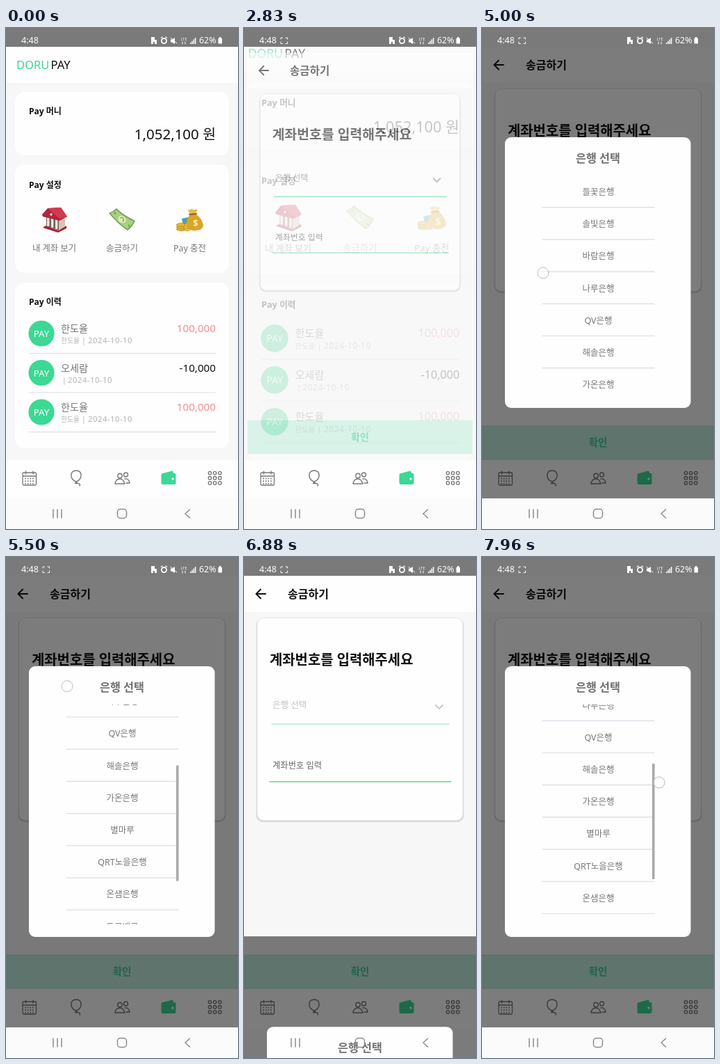
An HTML page that plays this animation: 334x720 px, repeating every 8 s.

```html
<!DOCTYPE html>
<html lang="ko">
<head>
<meta charset="utf-8">
<style>
html, body { margin: 0; width: 100%; height: 100%; overflow: hidden; background: #f7f7f7; }
svg { display: block; width: 334px; height: 720px; font-family: "Noto Sans", "Noto Sans CJK KR", "Noto Sans CJK", sans-serif; }
.line { fill: none; stroke-linecap: round; stroke-linejoin: round; }
</style>
</head>
<body>
<svg id="stage" viewBox="0 0 334 720"></svg>
<script>
const GREEN = '#3cd894', GREY = '#777', PALE = '#b3b3b3', INK = '#111', BG = '#f7f7f7', CARD = '#fefefe';
const LOOP = 8000, PITCH = 46.2, VIEW = 316, SLIDE = 693;

const text = (x, y, size, str, fill = INK, more = '') =>
  `<text x="${x}" y="${y}" font-size="${size}" fill="${fill}" ${more}>${str}</text>`;
const rect = (x, y, w, h, fill, r = 0, more = '') =>
  `<rect x="${x}" y="${y}" width="${w}" height="${h}" rx="${r}" fill="${fill}" ${more}/>`;
const circle = (x, y, r, fill, more = '') => `<circle cx="${x}" cy="${y}" r="${r}" fill="${fill}" ${more}/>`;
const ring = (x, y, r, stroke, w) => circle(x, y, r, 'none', `stroke="${stroke}" stroke-width="${w}"`);
const line = (d, stroke, w = 1) => `<path class="line" d="${d}" stroke="${stroke}" stroke-width="${w}"/>`;
const shape = (d, fill) => `<path d="${d}" fill="${fill}"/>`;
const BOLD = 'font-weight="700"', MID = 'text-anchor="middle"', END = 'text-anchor="end"';

const bankIcon =
  shape('M57 284L75 291 87 284 87 288 75 294 53 287Z', '#a32238') +
  shape('M58 270L76 275 76 291 58 285Z', '#7c5c55') +
  shape('M76 275L85 271 85 285 76 291Z', '#d9c3b4') +
  [59, 65, 71].map((x, i) => rect(x, 271 + i * 2, 3.4, 14, '#f4e7dc', 1)).join('') +
  shape('M52 268L60 259 79 258 88 271 77 277 53 271Z', '#b3243e') +
  shape('M60 259L79 258 88 271 77 274Z', '#cf3b50') +
  circle(65, 268, 1.8, '#f0d0c0');

const noteIcon =
  shape('M148 266Q154 264 159 259Q169 269 186 277Q182 286 175 291Q160 281 148 266Z', '#6f9f55') +
  shape('M150 266Q156 264 159 261Q169 271 184 278Q180 285 175 289Q161 280 150 266Z', '#a9cf82') +
  '<ellipse cx="167" cy="275" rx="6" ry="5" fill="#dcecb8" transform="rotate(35 167 275)"/>' +
  line('M165 273Q168 271 169 274T168 278', '#6f9f55', 1.2) +
  circle(157, 266, 1.5, '#6f9f55') + circle(177, 284, 1.5, '#6f9f55');

const bagIcon =
  shape('M253 274L262 272 264 280 255 283Z', '#4f9fa8') +
  [289, 286, 283].map(y => `<ellipse cx="252" cy="${y}" rx="6.5" ry="2.6" fill="#e8b62e" stroke="#a97a18" stroke-width=".7"/>`).join('') +
  [289, 286].map(y => `<ellipse cx="261" cy="${y}" rx="5" ry="2.4" fill="#f0c440" stroke="#a97a18" stroke-width=".7"/>`).join('') +
  shape('M265 268Q258 277 260 286Q265 292 274 291Q284 290 284 283Q282 273 273 267Z', '#d9a52b') +
  shape('M265 268L262 262Q266 259 270 261L276 261 273 267Z', '#e7bd48') +
  line('M264 268L274 267', '#8a5a20', 1.8) +
  text(273, 285, 13, '$', '#fff0b0', MID + ' ' + BOLD);

const row = (y, name, sub, amount, color) =>
  circle(51, y, 18.6, GREEN) + text(51, y + 5, 13.2, 'PAY', '#fff', MID) +
  text(79, y - 2, 14.2, name, GREY) +
  (sub ? text(79, y + 14, 9.8, sub, PALE) : '') +
  text(sub ? 109 : 81, y + 14, 10.5, '|', PALE) +
  text(sub ? 118 : 89, y + 14, 11.3, '2024-10-10', PALE, 'letter-spacing=".5"') +
  text(302, y - 2, 15.2, amount, color, END) +
  line(`M33 ${y + 28.5}H302`, '#ddd');

const home =
  rect(0, 27, 334, 594, BG) + rect(0, 27, 334, 52, CARD) +
  text(15, 59, 16.5, 'DORU', GREEN) + text(64.5, 59, 16.5, 'PAY', INK, 'font-weight="500"') +
  rect(13, 92, 308, 91, CARD, 14) + rect(13, 196, 308, 156, CARD, 14) + rect(13, 366, 308, 238, CARD, 14) +
  text(33, 124, 12, 'Pay 머니', INK, BOLD) +
  text(302, 160, 20.5, '1,052,100 원', INK, END) +
  text(33, 230, 12, 'Pay 설정', INK, BOLD) +
  text(33, 398, 12, 'Pay 이력', INK, BOLD) +
  bankIcon + text(69.5, 321, 12.3, '내 계좌 보기', GREY, MID) +
  `<g id="sendItem">${noteIcon}${text(167, 321, 12.5, '송금하기', GREY, MID)}</g>` +
  bagIcon + text(264.5, 321, 12.5, 'Pay 충전', GREY, MID) +
  row(439, '한도율', '한도율', '100,000', '#f09090') +
  row(495.5, '오세람', '', '-10,000', INK) +
  row(552, '한도율', '한도율', '100,000', '#f09090');

const send =
  rect(0, 27, 334, 594, BG) + rect(0, 27, 334, 52, CARD) +
  line('M31 53H18M24 46.5L17.5 53L24 59.5', INK, 2) +
  text(63, 59, 16, '송금하기', INK, BOLD) +
  rect(17.5, 88, 299, 293, '#d8d8dc', 10) + rect(19, 87.5, 296, 291, CARD, 9, 'stroke="#e6e6ea"') +
  text(37, 155, 19.9, '계좌번호를 입력해주세요', INK, BOLD) +
  `<g id="picker">${text(41, 217, 12.5, '은행 선택', '#858585')}
   ${line('M276 213L281 218L286 213', '#999', 2.2)}${line('M40 240H295', '#4fd8a4', 1.4)}</g>` +
  text(41, 304, 12.3, '계좌번호 입력', '#666') + line('M37 323H298', '#62d69a', 1.3) +
  rect(0, 571, 334, 50, '#c2eedd') + text(167, 601, 14.5, '확인', '#40cc98', MID + ' ' + BOLD);

const grid = (n, m, x, y, d, draw) =>
  Array.from({ length: n * m }, (_, i) => draw(x + i % n * d, y + (i / n | 0) * d)).join('');
const tabs =
  rect(0, 621, 334, 55, CARD) +
  line('M25.5 639H42Q43.5 639 43.5 640.5V655Q43.5 657 42 657H25.5Q24 657 24 655V640.5Q24 639 25.5 639ZM24 644H43.5M28.5 637V641M39 637V641', GREY, 1.3) +
  grid(4, 3, 28, 647.5, 3.6, (x, y) => rect(x - .8, y - .8, 1.7, 1.7, GREY)) +
  line('M101 636C111 636 110 649 101 652C92 649 91 636 101 636ZM101 652L99.5 654.5H103ZM102 654Q108 655 106 658', GREY, 1.4) +
  line('M157 655Q158 648 164 648Q169 648 171 655ZM171 648Q177 647 178 654H173', GREY, 1.4) +
  ring(164, 643.5, 3.2, GREY, 1.4) + ring(172.5, 642, 3, GREY, 1.4) +
  shape('M226 640L239 636.5Q241 636.5 241 640H243Q244.5 640 244.5 642V654Q244.5 656 242 656H226Q223.5 656 223.5 653V642Q223.5 640 226 640Z', GREEN) +
  circle(240, 648, 1.7, CARD) +
  grid(3, 3, 293.5, 639.5, 7.2, (x, y) => ring(x, y, 2.2, GREY, 1.3));

const navIcons =
  line('M68 692V704M74 692V704M80 692V704M264.5 692L258 698L264.5 704', '#8c8c8c', 1.5) +
  rect(160.5, 691.5, 13, 13, 'none', 4, 'stroke="#8c8c8c" stroke-width="1.5"');

const WHITE = '#fff';
const status =
  rect(0, 0, 334, 27, '#7a7a7a') + text(22, 22, 12.6, '4:48', WHITE) +
  `<g id="capture">${line('M53 16V14H55.5M60 14H62.5V16M53 20V22.5H55.5M60 22.5H62.5V20', WHITE)}</g>` +
  `<g id="captureDot">${ring(57.8, 18.2, 2, WHITE, 1)}</g>` +
  shape('M209 13H214V17H217V23H214V20H212V23H209Z', WHITE) +
  ring(227.5, 18.5, 3.6, WHITE, 1.8) + line('M223.5 14L225 13M231.5 14L230 13', WHITE, 1.5) +
  shape('M237 16.5H239L243 14V23L239 20.5H237Z', WHITE) + line('M237 14L246 22', WHITE) +
  text(256, 18, 5.5, 'LTE', WHITE, MID) + line('M254 23V20M258 20V23', WHITE) +
  [0, 1, 2, 3].map(i => rect(265 + i * 2.3, 21 - i * 2.3, 1.5, 2 + i * 2.3, WHITE)).join('') +
  text(278, 22, 12.4, '62%', WHITE) + rect(305.5, 14.5, 5.5, 8, WHITE, 1) + rect(307, 13, 2.5, 2, WHITE);

const banks = ['들꽃은행', '솔빛은행', '바람은행', '나루은행', 'QV은행', '해솔은행', '가온은행',
  '별마루', 'QRT노을은행', '온샘은행', '두루뱅크', '윤슬은행', '새벽은행'];
const THUMB = VIEW / (PITCH * banks.length);
const list = banks.map((name, i) => {
  const y = 212 + i * PITCH;
  return text(167.5, y + 28, 12.5, name, GREY, MID) + line(`M87 ${y + 45.7}H248`, '#dcdce4', 1.2);
}).join('');
const modal = rect(33, 157, 267.5, 389, CARD, 9) +
  text(167, 193, 16.3, '은행 선택', '#707070', MID + ' ' + BOLD) +
  `<g clip-path="url(#listBox)"><g id="list">${list}</g></g>` +
  rect(245, 212, 3.6, VIEW * THUMB, '#aaa', 1, 'id="thumb"');

const $ = id => document.getElementById(id);
$('stage').innerHTML = `<defs>
  <clipPath id="pageBox">${rect(0, 27, 334, 594, '#000')}</clipPath>
  <clipPath id="listBox">${rect(33, 212, 268, VIEW, '#000')}</clipPath></defs>` +
  rect(0, 0, 334, 720, BG) +
  `<g clip-path="url(#pageBox)"><g id="home">${home}</g><g id="send">${send}</g></g>` +
  tabs + rect(0, 676, 334, 44, '#fbfbfb') +
  rect(0, 27, 334, 649, 'rgba(0,0,0,.51)', 0, 'id="dim"') +
  `<g id="modal">${modal}</g>` + navIcons + status +
  circle(0, 0, 8, 'rgba(255,255,255,.45)', 'id="touch" stroke="#bbb"');

// Finger contacts: start, end, from x, from y, to x, to y
const listDrags = [
  [5000, 5600, 88, 352, 88, 174],
  [7380, 7960, 240, 485, 255, 324]
];
const touches = [
  [790, 1580, 167, 450, 167, 191],
  [1580, 2380, 167, 191, 167, 450],
  [2460, 2590, 167, 287, 167, 287],
  [3780, 3910, 165, 214, 165, 214],
  [6560, 6690, 165, 214, 165, 214],
  ...listDrags
];
const clamp = v => Math.max(0, Math.min(1, v));
const span = (t, a, b) => clamp((t - a) / (b - a));
const ease = u => (1 - Math.cos(Math.PI * u)) / 2;
const set = (id, name, value) => $(id).setAttribute(name, value);
const zoom = s => `translate(167 324) scale(${s}) translate(-167 -324)`;
const press = (t, at) => 1 - .8 * span(t, at, at + 100) * (1 - span(t, at + 200, at + 500));

function draw(t) {
  const p = 1 - (1 - span(t, 2698, 3098)) ** 4;
  set('home', 'transform', zoom(1 + .075 * p));
  set('home', 'opacity', p < 1 ? 1 - .6 * p : 0);
  set('send', 'transform', zoom(.85 + .15 * p));
  set('send', 'opacity', p < .8 ? p * .7 : .56 + (p - .8) * 2.2);
  set('sendItem', 'opacity', press(t, 2470));
  set('picker', 'opacity', press(t, 3790) * press(t, 6570));

  const open = ease(span(t, 4050, 4250)) - ease(span(t, 5759, 5959)) + ease(span(t, 6815, 7012));
  const shift = SLIDE * (1 - open);
  set('dim', 'y', 27 + shift);
  set('modal', 'transform', `translate(0 ${shift})`);

  const drag = listDrags[t < 6200 ? 0 : 1];
  const scroll = (drag[3] - drag[5]) * ease(span(t, drag[0], drag[1]));
  set('list', 'transform', `translate(0 ${-scroll})`);
  set('thumb', 'transform', `translate(0 ${scroll * THUMB})`);
  set('thumb', 'opacity', clamp(scroll / 5));

  const hit = touches.find(c => t >= c[0] && t <= c[1] + 40);
  set('touch', 'opacity', hit ? 1 : 0);
  if (hit) {
    const u = ease(span(t, hit[0], hit[1]));
    set('touch', 'cx', hit[2] + (hit[4] - hit[2]) * u);
    set('touch', 'cy', hit[3] + (hit[5] - hit[3]) * u);
  }
  set('capture', 'opacity', span(t, 290, 580));
  set('captureDot', 'opacity', t > 580 && t < 2460 ? 1 : 0);
}

const start = performance.now();
(function tick() {
  draw((performance.now() - start) % LOOP);
  requestAnimationFrame(tick);
})();
</script>
</body>
</html>
```
